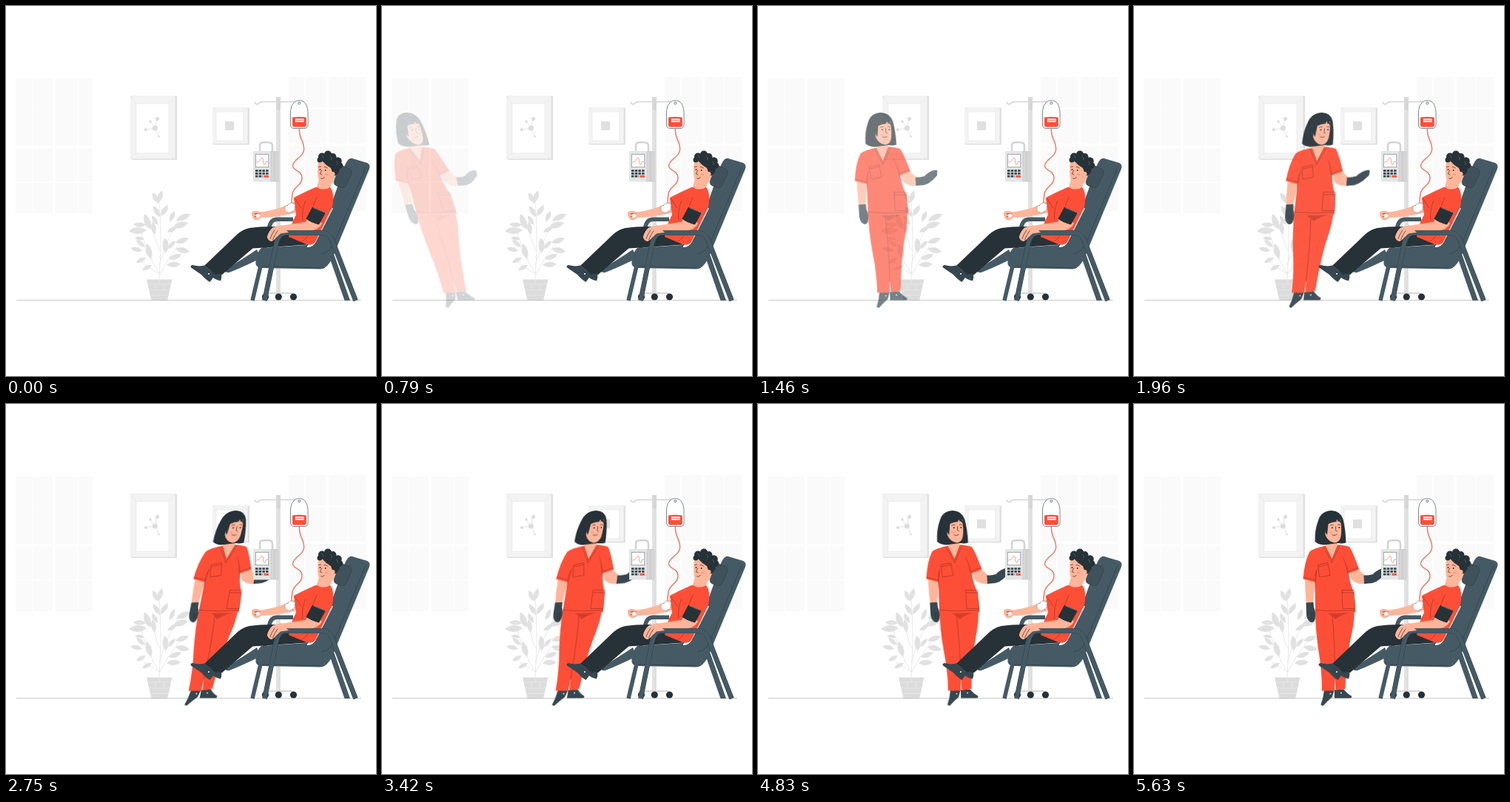
An HTML page for the animation above (5.68 s loop, 500 px wide and 500 px high).

```html
<!DOCTYPE html>
<html lang="en">
<head>
<meta charset="utf-8">
<title>Blood donation</title>
<style>
html, body { margin: 0; width: 100%; height: 100%; overflow: hidden; background: #fff; }
svg { display: block; width: 100%; height: 100%; }

.red { fill: #fd4f37; }
.skin { fill: #ffb599; }
.ink { fill: #263238; }
.slate { fill: #455a64; }
.deep { fill: #37474f; }
.fold { fill: #b5301f; opacity: .55; }
.line { fill: none; stroke: #263238; stroke-width: .7; stroke-linecap: round; stroke-linejoin: round; }
.seam { fill: none; stroke: #9c2c1e; stroke-width: .6; stroke-linejoin: round; }

/* keeps the nurse off stage until she starts to fade in */
#entry { animation: show 5680ms step-end infinite; }
#nurse {
  transform-box: view-box;
  transform-origin: 250px 276px;
  animation: arrive 5680ms cubic-bezier(.36, -.01, .5, 1.38) infinite;
}
@keyframes show {
  0% { visibility: hidden; }
  7.39%, 100% { visibility: visible; }
}
@keyframes arrive {
  0% { transform: translate3d(-250px, 0, 0) skewX(20deg); opacity: 0; }
  55% { opacity: 1; }
  59% { transform: skewX(-10deg); }
  80% { transform: skewX(2deg); }
  100% { transform: translate3d(0, 0, 0); opacity: 1; }
}
</style>
</head>
<body>
<svg viewBox="0 0 500 500">

<!-- windows -->
<g fill="#fafafa">
  <rect x="13" y="98" width="104" height="182"/>
  <rect x="382" y="96" width="105" height="181"/>
</g>
<g fill="none" stroke="#fff">
  <path stroke-width="3.5" d="M64.7 98V280M13 190.8H117M434 96V277M382 187.5H487"/>
  <path stroke-width="1.3" d="M36.5 98V280M96.5 98V280M13 238H117M404 96V277M462.500 96V277M382 138.500H487"/>
</g>

<!-- wall pictures -->
<g>
  <path fill="#e0e0e0" d="M168 121.500H231V208H171L168 206Z"/>
  <path fill="#f3f3f3" d="M168 121.500H228.500V206.500H168Z"/>
  <path fill="#fff" stroke="#e8e8e8" stroke-width=".7" d="M176 132H220V199H176Z"/>
  <path fill="none" stroke="#e6e6e6" stroke-width=".6" d="M168 121.500L176 132M228.500 121.500L220 132M168 206.500L176 199M228.500 206.500L220 199"/>
  <path fill="none" stroke="#dedede" stroke-width=".8" d="M201 165L204.500 152.500M201 165L195 156M201 165L188.800 167M201 165L206.500 176.500"/>
  <g fill="#dcdcdc">
    <circle cx="201.300" cy="165" r="3.500"/><circle cx="204.500" cy="152.500" r="2.600"/>
    <circle cx="195" cy="156" r="1.700"/><circle cx="188.800" cy="167" r="2"/><circle cx="206.500" cy="176.500" r="1.300"/>
  </g>
  <path fill="#e0e0e0" d="M279 137.500H329V187.500H281L279 186Z"/>
  <path fill="#f3f3f3" d="M279 137.500H326.500V186H279Z"/>
  <path fill="#fff" stroke="#e8e8e8" stroke-width=".7" d="M284 143H320.500V182H284Z"/>
  <path fill="none" stroke="#e6e6e6" stroke-width=".6" d="M279 137.500L284 143M326.500 137.500L320.500 143M279 186L284 182M326.500 186L320.500 182"/>
  <rect x="296" y="156" width="12" height="12" fill="#e0e0e0"/>
</g>

<!-- plant -->
<g>
  <path fill="none" stroke="#e6e6e6" stroke-width=".9" d="M207 370Q211 310 207 262M207 362Q190 335 181 300M207 350Q219 310 236 285M207 362Q190 352 180 342M208 362Q222 334 240 316M207 330Q200 305 190 285"/>
  <g id="leaves" fill="#e1e1e1"></g>
  <path fill="#dcdcdc" d="M190 369.500H224.500L218 398H196.500Z"/>
  <path fill="none" stroke="#e9e9e9" stroke-width=".8" d="M191.500 376H223M193 384H221.500M194.800 391H219.800M207 370V376M202 376V384M213 376V384"/>
</g>

<path d="M14 397.700H480" stroke="#b8b8b8" stroke-width=".8"/>

<!-- nurse -->
<g id="entry"><g id="nurse">
  <path class="deep" d="M271 386.500L283.500 385.500Q288 391.500 294 394.500Q295 397.200 292 397.500H271Z"/>
  <path class="deep" d="M257 387H270.500L268 396Q262 401 255.500 408L252.500 406.500Q256 397 257 387Z"/>
  <circle cx="265.500" cy="391.500" r=".9" fill="#fff"/><circle cx="280" cy="390.500" r=".9" fill="#fff"/>
  <path class="red" d="M245 279H297.500Q298.500 290 294.500 309Q288 337 285.500 385L272.500 387L271.500 370L271 387.500H254Q254 360 249.500 334Q245 304 245 279Z"/>
  <path class="seam" d="M268 287Q271.500 320 271.500 372"/>
  <path class="fold" d="M262 283L294 281.500Q281 284 272 291Q268 286 262 283Z"/>

  <path class="skin" d="M231 236L244.500 239Q243.500 256 242 270L233 270Q231 254 231 236Z"/>
  <path class="deep" d="M232.500 268.500L242.500 268L243 275Q246 281 245 289Q244 295.500 239.500 295Q234 293 233 285Z"/>
  <path d="M239 282L240.500 293M242 283L242.500 291" class="line" stroke-width=".5"/>

  <path class="skin" d="M290 222L302 220Q305 227 313 231.500L312 243Q299 244 293 236Z"/>
  <path class="deep" d="M310.500 231.800Q318 231.500 323 230Q327 225 334 222.500Q339 221 340.500 222.500Q340 226 340 229L333 236Q328 240.500 322 242L311 243Z"/>

  <path class="red" d="M262 191L274 190Q285 191 291 193Q296 200 304 223.500L289.500 229Q292 242 297 255L299.500 281.500Q272 284 245 281.500L244.500 240.500L228.500 236.500Q230 214 237 200Q241 195 262 191Z"/>
  <path class="fold" d="M280 203Q286 216 288.500 229L291.500 237Q290 219 280 203Z"/>
  <path class="fold" d="M248 221Q243 228 244.300 241L245.300 252Q246 233 248 221Z"/>
  <path class="seam" d="M228.800 234L244.500 238M303.200 221L289 226.500M244.800 278.500Q272 281 299 278.500"/>
  <path class="seam" d="M248.500 217.500L262 214.500L265 231.500L250.500 234ZM249 220L262.300 217"/>
  <path class="seam" d="M281 251.500H297L299 276.500H282ZM281.200 255H297.400"/>
  <path class="skin" d="M262 181H274.500L275 191.500L267.500 210L258.500 192Z"/>
  <path class="seam" d="M258.500 192L267.500 210.500L275 191.500M256 193L267.500 214.500L278 191.500"/>

  <path class="ink" d="M244.500 186Q244 170 249 157Q253 144.500 267 144Q279 144.500 282.500 156Q286 170 286.300 187.500Q281 189 275 188L256 190.500Q248 189.500 244.500 186Z"/>
  <path class="skin" d="M258 158L279 156Q281 168 279.500 179Q277.500 187.500 270.500 187.500Q262 186 258.500 177Z"/>
  <path class="ink" d="M255 158Q258 149 268 148Q278 151 281 163Q279 160.500 277.500 158.800L275.500 158.800L274 152L273.500 159Q267 159.500 262.500 162L261 177Q256 171 255 158Z"/>
  <path class="line" stroke="#fff" d="M272.500 165.500V171L274.500 172M265 164Q267 162.500 269 163.500M275.500 163Q277.500 162.500 279 163.500M268 177Q271 178.500 274 176.500"/>
  <circle class="ink" cx="267.700" cy="167.300" r="1"/><circle class="ink" cx="277.300" cy="167" r="1"/>
  <ellipse cx="266.300" cy="173.500" rx="2" ry="1.500" fill="#fb8d78" opacity=".5"/>
</g></g>

<!-- drip stand -->
<g>
  <path fill="none" stroke="#d4d4d4" stroke-width="1.700" stroke-linecap="round" d="M336.500 130Q337.500 133.500 340.500 132.500Q343 129.500 346 129.500H394"/>
  <rect x="365" y="123" width="5.500" height="266" fill="#e2e2e2"/>
  <path d="M370 123V389" stroke="#d2d2d2" stroke-width=".8"/>
  <rect x="365" y="123" width="6" height="18" fill="#d6d6d6"/>
  <path fill="none" stroke="#d9d9d9" stroke-width="2.200" d="M350 391Q350 388 354 388H384Q388 388 388.500 391"/>
  <g class="ink"><circle cx="350.500" cy="393" r="4.600"/><circle cx="368.300" cy="393" r="4.600"/><circle cx="388.500" cy="393" r="4.600"/></g>

  <path fill="none" stroke="#d4d4d4" stroke-width="2.600" d="M343 197V189Q343 184.300 348 184.300H355Q360 184.300 360 189V197"/>
  <rect x="356" y="196" width="12.500" height="41.500" fill="#d0d0d0"/>
  <rect x="334" y="196" width="23.500" height="41.500" fill="#e5e5e5"/>
  <path d="M360 198V236M366 198V236" stroke="#dedede" stroke-width="1"/>
  <rect x="337.300" y="200.300" width="17.500" height="17.500" fill="#fff" stroke="#7d888d" stroke-width=".7"/>
  <path fill="none" stroke="#fd7462" stroke-width=".7" d="M338.500 211L341.500 210.500L344.500 206.500Q347 202.500 347.500 209.500Q348 216 350 214L351.500 210.500H354"/>
  <path fill="none" stroke="#37474f" stroke-width="2.700" stroke-dasharray="3.500 1.200" d="M337 222.600H355M337 226.400H355M337 230.200H347"/>
  <rect x="348.300" y="228.800" width="6.700" height="2.800" class="red"/>

  <path fill="#fff" stroke="#4c5a61" stroke-width=".7" d="M384.500 161V142Q385 134 389.500 130Q396 125.500 402.500 129.500Q407.500 134 408 143V161Q407.500 165.500 403 165.500H390Q385 165.500 384.500 161Z"/>
  <circle cx="396.300" cy="131.300" r="1.500" fill="#fff" stroke="#37474f" stroke-width=".7"/>
  <path class="red" d="M387 150.500Q396 149 405.800 150.500V161Q405.500 163.500 403 163.500H390Q387 163.500 387 161Z"/>
  <rect x="391" y="152.300" width="11.500" height="4.500" fill="#fff"/>
  <path d="M392.500 154.500H401" stroke="#fd4f37" stroke-width=".8"/>
</g>

<!-- far side of the chair -->
<path fill="none" stroke="#455a64" stroke-width="5.500" stroke-linejoin="round" d="M333 398L350 326L355.500 300Q357.500 288.500 366 288.300H388"/>
<path class="slate" d="M294.500 357Q320 342 339 329L344 341Q322 352 302 360Q297 361 294.500 357Z"/>
<path class="slate" d="M432 325H439.500L465 398H457.500Z"/>

<!-- backrest and seat -->
<path class="slate" d="M467 205.800L488 212Q493 214.500 491 220L447 326Q437 355.500 425 355.500L344 354Q336.500 353 337.500 345Q339 332 345 327L405 323Q420 318 428 300L456 222Q460 206 467 205.800Z"/>
<path fill="none" stroke="#2f3d45" stroke-width=".6" d="M486 218L444 318Q438 334 426 335M345 352L425 353.500"/>
<path fill="#3f525b" stroke="#2f3d45" stroke-width=".6" d="M455 216L464 219.500Q468 222 466.500 227L460 242Q457.500 247 452 245L446.500 243Q442 241 443.500 236L449 221Q451 215.500 455 216Z"/>

<!-- patient legs -->
<path class="deep" d="M276 358L291 361Q292 367 290 371.500Q283 370 277 365Z"/>
<path class="ink" d="M366 299L334 300Q323 303 316 314L276 360L292 363L334 327L380 322Z"/>
<path class="ink" d="M414 322Q417 314 410 307L366 298Q345 297.500 329 300Q320 302 313 308L268 351L283.500 363.500L325 328L350 326.500Z"/>
<path d="M268 351L283.500 363.500" stroke="#45545b" stroke-width=".6"/>
<path class="deep" d="M267.500 350.500L282 362.500Q280 368 275.500 373Q270 370 264 363L250 353.500Q248.500 350.500 252 350Q261 352.500 267.500 350.500Z"/>
<circle cx="274" cy="362" r="1" fill="#fff"/>

<!-- patient body -->
<path class="skin" d="M394 263L402 275L386 281Q365 285.500 345 286Q342 289.500 337 289.500Q331.500 286 332 279.500Q334 275.500 341 277.500L345 278.500Q368 275 379 269Z"/>
<path class="line" stroke-width=".5" d="M336 281Q340 279.500 343 281M336 285Q339 283.500 342 284.500"/>
<path fill="#fff" stroke="#fff" stroke-width="2" d="M407 325Q415 325 419 316L441 273"/>
<path class="red" d="M389 259Q402 252 418 245L437 244Q443 249 442 262Q441 274 434 286L419 317Q416 324.500 406 322L382 312Q384 296 392 282Z"/>
<path class="seam" d="M390 260L399 273M405 263Q399 276 401 290M409 309Q405 316 399 319"/>
<path class="skin" d="M414 282L427 294Q422 303 411 303.500L372 308Q366 314 359 318Q354.500 317.500 353 312Q355 304 361 299L370 297L404 292Z"/>
<path class="red" d="M422 252Q433 245 440 254Q444 263 440 275L431 283L415 272Z"/>
<path class="seam" d="M420 258L415 271"/>
<path class="ink" d="M414 271.500L432 279L423 295.500Q412 293 405.500 287.500Z"/>
<path d="M415 272.500L432 279.500" stroke="#fff" stroke-width=".6" opacity=".6"/>

<!-- patient head -->
<path class="skin" d="M425 228L441 229L439 243Q435 249 424 247L420 244Z"/>
<path class="skin" d="M422 211Q428 204 439 209L444 220Q446 234 440 240Q434 245 426 241.500Q419 233 422 211Z"/>
<g class="ink">
  <path d="M423 208Q432 200 444 207Q454 213 450 224Q446 231 442.500 229L439 219Q432 215 428 210Z"/>
  <circle cx="427" cy="203.500" r="5"/><circle cx="435" cy="200.500" r="5"/><circle cx="441.500" cy="204" r="5"/>
  <circle cx="448.500" cy="209.500" r="5.200"/><circle cx="451" cy="215.500" r="4.300"/><circle cx="445" cy="223" r="4"/>
  <circle cx="424" cy="208" r="3.500"/><circle cx="434" cy="209" r="4.500"/>
</g>
<path fill="none" stroke="#6b7a82" stroke-width=".6" d="M426 202Q429 203 429 206M438 203Q441 204 440 208M446 210Q449 211 448 215"/>
<circle class="skin" cx="441.500" cy="227" r="3"/>
<path class="line" d="M426.500 222L424.500 227L427 228M422.500 217.500L425.500 217M430 217.500Q432.500 217 434.500 219M425.500 233Q428 234.300 430.500 231.500"/>
<circle class="ink" cx="424.500" cy="221" r=".9"/><circle class="ink" cx="431.700" cy="222" r=".9"/>
<ellipse cx="433" cy="228" rx="2.300" ry="1.700" fill="#fb8d78" opacity=".5"/>

<!-- tube and dressing -->
<path fill="none" stroke="#f0816f" stroke-width="1.600" d="M396.500 165.500C395 179 404 183 402.500 195C401 205 388 207 387.500 216C388 223 400 222 400 232C400 243 389 243 387 254Q385.500 262 386 271"/>
<path fill="#fff" stroke="#8f999e" stroke-width=".7" d="M377 274Q376 269.500 381 269.500Q383 265 387.500 266.500Q392 267 390 272Q391 277 386.500 277.500Q383.500 281 380 278.500Q376.500 278 377 274Z"/>
<path fill="#f4f4f4" stroke="#c8c8c8" stroke-width=".6" d="M338 282Q341 279 343.500 282Q344 286 340 286.500Q337 285 338 282Z"/>

<!-- near side of the chair -->
<g fill="none" stroke-linejoin="round">
  <path id="rail" stroke="#2f3d45" stroke-width="6.600" d="M349.500 398L364 327Q367 306.500 378 306.500H428Q437 306.500 441 317L472.500 398"/>
  <path stroke="#455a64" stroke-width="5.800" d="M349.500 398L364 327Q367 306.500 378 306.500H428Q437 306.500 441 317L472.500 398"/>
</g>
<path class="skin" d="M372 296L360 300Q354 306 353 313Q355 318 360 317.500Q365 313 371 307.500L382 306Z"/>
<path class="line" stroke-width=".5" d="M363 303Q359 308 357 314.500M367 304Q363 309 360.500 316"/>
</svg>

<script>
// each leaf: base x, base y, tip x, tip y
const leaves = [
  [206, 266, 211, 249], [206, 267, 198, 252],
  [208, 285, 199, 270], [209, 284, 219, 269], [205, 296, 197, 283],
  [195, 302, 187, 281], [190, 303, 166, 304], [189, 296, 172, 295],
  [187, 315, 174, 313], [184, 331, 168, 327], [188, 326, 176, 316],
  [196, 342, 190, 321], [189, 340, 176, 347], [197, 350, 184, 357],
  [221, 292, 228, 277], [230, 290, 249, 281], [226, 299, 246, 293],
  [218, 306, 231, 298], [229, 320, 247, 314], [229, 328, 248, 332],
  [216, 334, 215, 313], [220, 342, 237, 336], [217, 350, 236, 349],
  [201, 309, 198, 291], [219, 328, 229, 317]
];
const leafPath = ([x, y, tx, ty]) => {
  const mx = (x + tx) / 2, my = (y + ty) / 2;
  const nx = (y - ty) * .38, ny = (tx - x) * .38;
  return `M${x} ${y}Q${mx + nx} ${my + ny} ${tx} ${ty}Q${mx - nx} ${my - ny} ${x} ${y}Z`;
};
document.getElementById('leaves').innerHTML = `<path d="${leaves.map(leafPath).join('')}"/>`;
</script>
</body>
</html>
```
